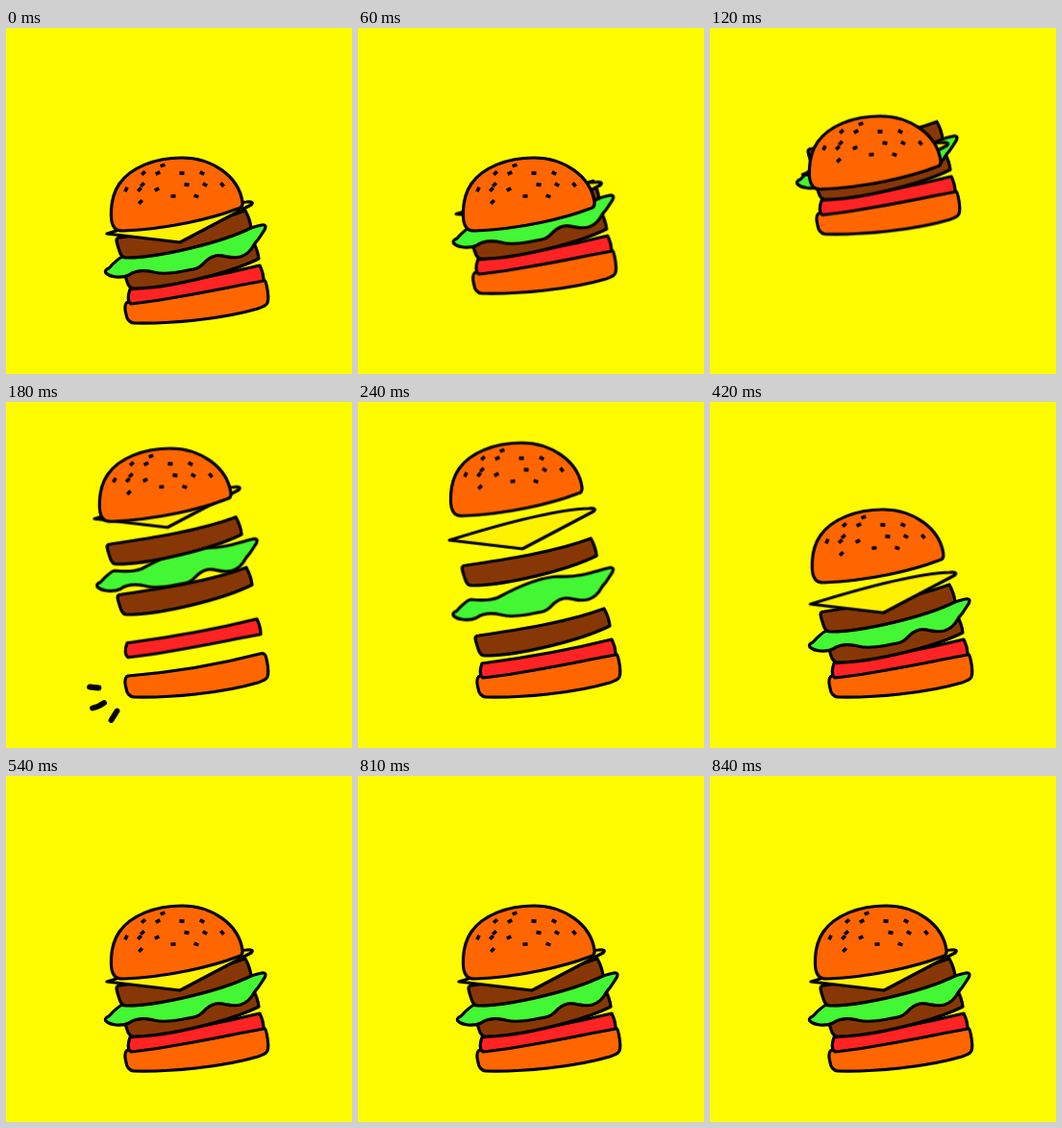
An HTML page for the animation above (1260 ms loop, 360 by 360 pixels).

```html
<!DOCTYPE html>
<html lang="en">
<head>
<meta charset="utf-8">
<title>Burger hop</title>
<style>
  html, body { margin: 0; width: 100%; height: 100%; overflow: hidden; background: #fffc00; }
  svg { display: block; width: 100vw; height: 100vh; }
  .part { stroke: #000; stroke-width: 3.2; stroke-linejoin: round; stroke-linecap: round; }
  .orange { fill: #ff6600; }
  .brown { fill: #873705; }
  .red { fill: #ff2323; }
  .green { fill: #44f734; }
  .yellow { fill: #fff200; }
  #seeds { fill: none; stroke-width: 3.6; stroke-linecap: butt; }
  #sparks { fill: none; stroke: #000; stroke-width: 5.8; stroke-linecap: round; }
</style>
</head>
<body>
<svg viewBox="0 0 360 360">
  <g id="base" class="part orange">
    <path d="M127 285C175 281 222 273 264 262Q270 260 271 267Q274 280 272 286Q271 289 262 292C225 303 170 308 133 307Q126 306 125 298Q122 287 127 285Z"/>
  </g>
  <g id="tomato" class="part red">
    <path d="M129 272C175 266 220 258 264 247Q268 255 268 263C220 272 170 283 130 287Q125 283 129 272Z"/>
  </g>
  <g id="lowPatty" class="part brown">
    <use href="#patty" x="8" y="32"/>
  </g>
  <g id="lettuce" class="part green">
    <path d="M104 255Q102 252 107 250Q118 238 122 238Q140 240 150 236C172 224 195 214 215 214C235 215 250 209 266 205Q272 204 269 210C266 214 264 219 259 224C254 233 250 236 244 238C232 241 226 235 218 237C205 240 207 249 195 251C180 254 165 257 154 254C140 251 132 254 128 257C120 261 108 259 104 255Z"/>
  </g>
  <g id="topPatty" class="part brown">
    <path id="patty" d="M119 218C160 212 212 204 249 190Q254 199 255 208C225 223 160 239 125 239Q120 239 118 232Q115 223 115 221Q115 218 119 218Z"/>
  </g>
  <g id="cheese" class="part yellow">
    <path d="M105 214C150 200 215 182 250 181Q259 180 255 184L181 223Z"/>
  </g>
  <g id="bun" class="part orange">
    <path d="M113 208C108 203 107 178 118 162C130 145 155 135 183 135C214 135 242 154 246 181Q247 187 241 188C215 198 170 209 122 211Q115 211 113 208Z"/>
    <path id="seeds"/>
  </g>
  <path id="sparks" d="M87 296.500L96.500 297.500M90 318.500Q97 317 102 313M109.500 331L115.500 321.500"/>
</svg>
<script>
const LOOP = 1260, TICK = 30;
const HEIGHT = 92.5, LEAN = 0.14;

// Start and end of each part's way up and way down, in ms
const hops = {
  base:     { up: [30, 120], down: [120, 180] },
  tomato:   { up: [30, 120], down: [120, 198] },
  lowPatty: { up: [30, 120], down: [120, 250] },
  lettuce:  { up: [30, 120], down: [120, 305] },
  topPatty: { up: [30, 120], down: [120, 370] },
  cheese:   { up: [30, 165], down: [180, 430] },
  bun:      { up: [60, 188], down: [240, 480] }
};

const progress = ([from, to], t) => Math.min(1, Math.max(0, (t - from) / (to - from)));

// One held keyframe per tick; the touchdown pose lasts two ticks
function play(id, pose) {
  const frames = [];
  for (let t = 0; t <= LOOP; t += TICK) {
    frames.push({ offset: t / LOOP, easing: "step-end", ...pose(t === 210 ? 180 : t) });
  }
  document.getElementById(id).animate(frames, { duration: LOOP, iterations: Infinity });
}

// Seeds fan out with the curve of the bun
function sowSeeds() {
  const rows = {
    143: [163], 151: [143, 158, 183, 204], 163: [142, 188, 207, 225],
    168: [125, 139, 157], 175: [174, 198], 181: [140]
  };
  let d = "";
  for (const [y, xs] of Object.entries(rows)) {
    for (const x of xs) {
      const a = (x - 180) / 50, dx = 2.5 * Math.cos(a), dy = 2.5 * Math.sin(a);
      d += `M${x - dx} ${y - dy}l${2 * dx} ${2 * dy}`;
    }
  }
  document.getElementById("seeds").setAttribute("d", d);
}

sowSeeds();
for (const [id, { up, down }] of Object.entries(hops)) {
  play(id, t => {
    const y = HEIGHT * (progress(down, t) - progress(up, t));
    return { transform: `translate(${y * LEAN}px, ${y}px)` };
  });
}
play("sparks", t => ({ opacity: t === 180 ? 1 : 0 }));
</script>
</body>
</html>
```
